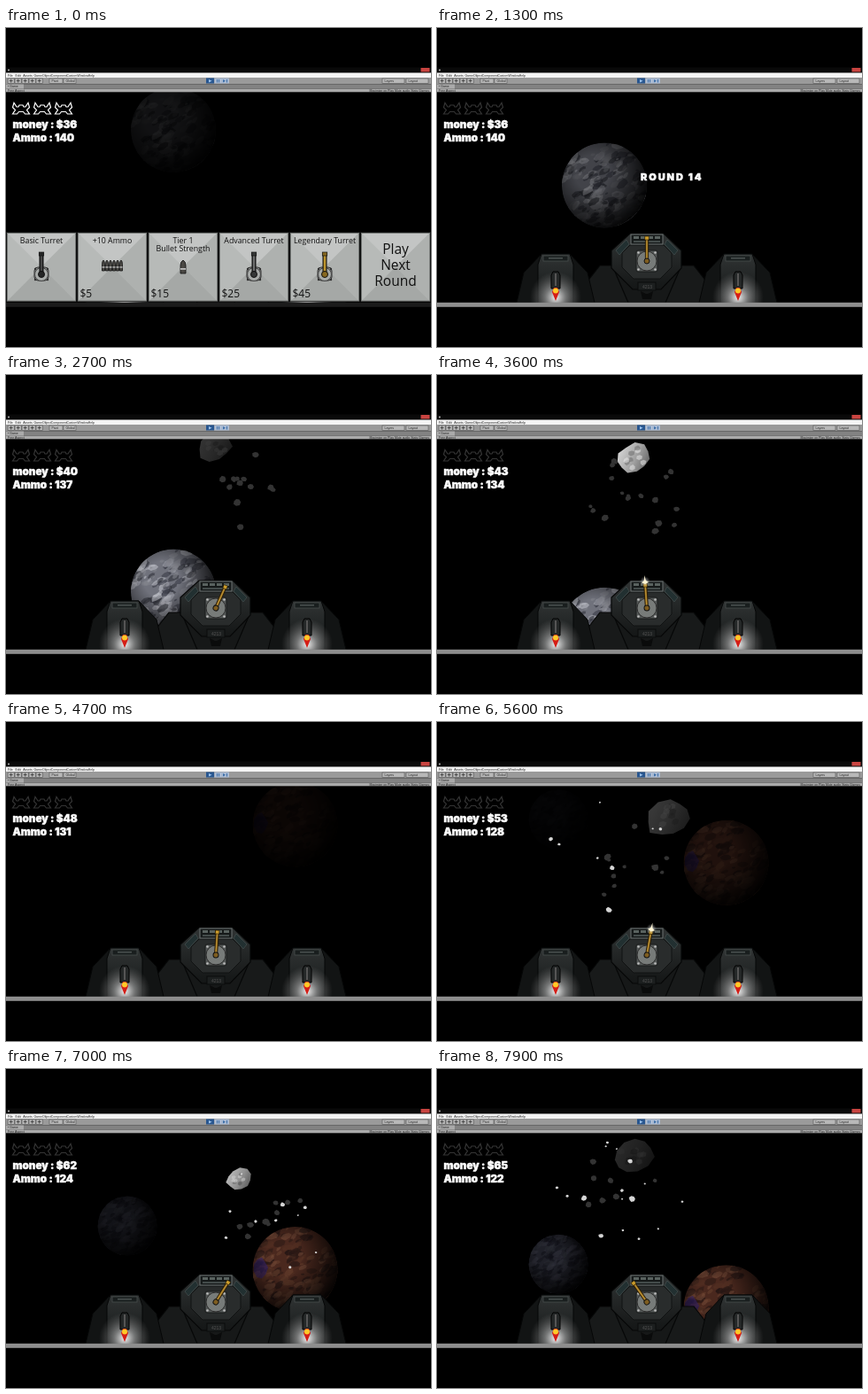
Animation of 480 by 360 pixels, one loop 8 s. Source, as an HTML page:

```html
<!DOCTYPE html>
<html lang="en">
<head>
<meta charset="utf-8">
<title>Asteroid defence</title>
<style>
html, body { margin: 0; width: 100%; height: 100%; overflow: hidden; background: #000; }
svg { display: block; width: 100vw; height: 100vh; }
.hud { font: 900 11.7px Inter, sans-serif; fill: #fff; stroke: #fff; stroke-width: .5; }
#round { font-size: 11px; letter-spacing: 1.9px; }
.card { font: 8.8px "Open Sans", sans-serif; fill: #111; }
.price { font: 12px "Open Sans", sans-serif; fill: #111; }
.play { font: 15.5px "Open Sans", sans-serif; fill: #111; }
.tiny { font: 3.5px "Liberation Sans", sans-serif; fill: #222; }
</style>
</head>
<body>
<svg viewBox="0 0 480 360">
  <defs>
    <radialGradient id="lamp">
      <stop offset="0" stop-color="#fff" stop-opacity=".95"/>
      <stop offset=".4" stop-color="#ccc" stop-opacity=".5"/>
      <stop offset="1" stop-color="#888" stop-opacity="0"/>
    </radialGradient>
    <radialGradient id="shade" cx=".36" cy=".36" r=".68">
      <stop offset=".3" stop-opacity="0"/>
      <stop offset="1" stop-opacity=".92"/>
    </radialGradient>
    <linearGradient id="hull" x2="0" y2="1">
      <stop offset="0" stop-color="#303434"/>
      <stop offset="1" stop-color="#141616"/>
    </linearGradient>
    <linearGradient id="stone" x2="1" y2="1">
      <stop offset="0" stop-color="#e0e0e0"/>
      <stop offset=".55" stop-color="#a0a0a0"/>
      <stop offset="1" stop-color="#555"/>
    </linearGradient>
    <clipPath id="view"><rect y="72" width="480" height="238"/></clipPath>
  </defs>
  <rect width="480" height="360"/>
  <g clip-path="url(#view)">
    <g id="planets"></g>
    <g id="rocks"></g>
    <g id="base"></g>
    <g id="barrel"></g>
  </g>
  <g id="lives" fill="none" stroke-width="1.2"></g>
  <text id="money" class="hud" x="7.5" y="112.5"></text>
  <text id="ammo" class="hud" x="7.5" y="127.5"></text>
  <text id="round" class="hud" x="230" y="172">ROUND 14</text>
  <g id="editor"></g>
  <rect id="status" y="309.8" width="480" height="5"/>
  <g id="shop"></g>
</svg>
<script>
const NS = 'http://www.w3.org/2000/svg';
const $ = id => document.getElementById(id);
const LOOP = 8000, STEP = 100;

function add(parent, tag, attrs = {}, text) {
  const node = document.createElementNS(NS, tag);
  for (const key in attrs) node.setAttribute(key, attrs[key]);
  if (text !== undefined) node.textContent = text;
  return parent.appendChild(node);
}
const rect = (p, x, y, width, height, fill, more) => add(p, 'rect', { x, y, width, height, fill, ...more });
const poly = (p, points, fill, more) => add(p, 'polygon', { points, fill, ...more });
const circle = (p, cx, cy, r, fill, more) => add(p, 'circle', { cx, cy, r, fill, ...more });
const label = (p, x, y, text, cls, more) => add(p, 'text', { x, y, class: cls, ...more }, text);
const show = (node, on) => node.setAttribute('display', on ? 'inline' : 'none');
const move = (node, x, y, turn = 0) => node.setAttribute('transform', `translate(${x} ${y}) rotate(${turn})`);
const clamp = v => Math.max(0, Math.min(1, v));

const random = seed => () => (seed = (seed * 16807) % 2147483647) / 2147483647;

function blob(rnd, rx, ry, count) {
  return Array.from({ length: count }, (_, i) => {
    const a = i / count * Math.PI * 2, k = .8 + rnd() * .3;
    return (Math.cos(a) * rx * k).toFixed(1) + ',' + (Math.sin(a) * ry * k).toFixed(1);
  }).join(' ');
}

// Linear interpolation over [time, value] pairs
function track(keys, t) {
  const next = keys.findIndex(([time]) => t <= time);
  if (next === 0) return keys[0][1];
  if (next < 0) return keys[keys.length - 1][1];
  const [[a, from], [b, to]] = [keys[next - 1], keys[next]];
  return from + (to - from) * (t - a) / (b - a);
}

// A planet sinks at a steady rate and brightens on the way down
const SINK = 48;
function makePlanet(id, x, y0, r, ground, patches) {
  const rnd = random(r * 31 + x), node = add($('planets'), 'g');
  const clip = add(add(node, 'clipPath', { id }), 'circle', { r });
  const disc = add(node, 'g', { 'clip-path': `url(#${id})` });
  circle(disc, 0, 0, r, ground);
  for (let i = 0; i < 190; i++) {
    const a = rnd() * 6.28, d = Math.sqrt(rnd()) * r, s = 1 + rnd() * r * .07;
    const patch = poly(disc, blob(rnd, s * 2, s, 7), patches[i % patches.length], { opacity: .55 });
    move(patch, Math.cos(a) * d, Math.sin(a) * d, -60 + rnd() * 60);
  }
  if (id === 'red') move(poly(disc, blob(rnd, 8, 12, 9), '#2a1f78', { opacity: .5 }), -39, -2);
  circle(disc, 0, 0, r + 1, 'url(#shade)');
  return { x, y0, node };
}
const planets = [
  makePlanet('grey', 189, 115, 48, '#70727c', ['#a9abb4', '#363843', '#85878f', '#292a32', '#c4c5cc']),
  makePlanet('red', 326.5, -110, 48, '#4a281e', ['#68402f', '#2b1814', '#553023', '#201313', '#754c3a']),
  makePlanet('dusk', 137, -159, 33.5, '#202129', ['#30313b', '#15151c', '#292a32', '#101016'])
];

// Each wave: an asteroid at x, y at a given time, with debris flying out of a point beside it
const waves = [
  { at: 2.7, x: 237, y: 80, size: 19, glow: .25, side: 25, dim: 13, lit: 0 },
  { at: 3.6, x: 222, y: 94, size: 19, glow: 1, side: 3, dim: 17, lit: 0 },
  { at: 5.6, x: 262, y: 108, size: 24, glow: .28, side: -65, dim: 11, lit: 8 },
  { at: 7.0, x: 263, y: 125, size: 14, glow: .9, side: 25, dim: 9, lit: 10 },
  { at: 7.9, x: 222, y: 98, size: 22, glow: .2, side: -15, dim: 7, lit: 16 }
];
const rnd = random(73);
for (const wave of waves) {
  wave.node = add($('rocks'), 'g');
  const body = wave.body = add(wave.node, 'g', { opacity: wave.glow });
  poly(body, blob(rnd, wave.size * 1.08, wave.size * .86, 11), 'url(#stone)');
  for (let i = 0; i < 9; i++) {
    const spot = poly(body, blob(rnd, wave.size * .2, wave.size * .16, 6), i % 2 ? '#666' : '#eee', { opacity: .5 });
    move(spot, (rnd() - .5) * wave.size, (rnd() - .5) * wave.size);
  }
  wave.bits = Array.from({ length: wave.dim + wave.lit }, (_, i) => {
    const lit = i >= wave.dim, a = rnd() * 6.28, d = rnd() * (lit ? 85 : 65);
    const r = lit ? 1 + rnd() * rnd() * 3 : 2 + rnd() * 2;
    const node = poly(wave.node, blob(rnd, r * 1.1, r, 7), lit ? '#d5d5d5' : '#333');
    return { dx: Math.cos(a) * d, dy: Math.sin(a) * d * .75, node };
  });
}

function renderWave(wave, t) {
  const dt = t - wave.at;
  show(wave.node, dt > -.75 && dt < .6);
  move(wave.body, wave.x, wave.y + 36 * dt, -25 + dt * 25);
  for (const { dx, dy, node } of wave.bits) {
    const spread = 1 + dt * .4;
    move(node, wave.x + wave.side + dx * spread, wave.y + 45 + dy * spread + 14 * dt, dt * 50);
  }
}

function sideTurret(x) {
  const g = add($('base'), 'g', { transform: `translate(${x} 0)` });
  const edge = { stroke: '#050606', 'stroke-width': 1 };
  poly(g, '-16,255 16,255 36,276 44,310 -44,310 -36,276', '#121414', edge);
  poly(g, '-16,255 16,255 20,267 20,310 -20,310 -20,267', 'url(#hull)', edge);
  rect(g, -14, 257, 28, 6, '#191e1e', { stroke: '#484e4d', 'stroke-width': .8 });
  rect(g, -8, 259, 16, 1.5, '#4b5251');
  circle(g, 0, 304, 29, 'url(#lamp)');
  poly(g, '-3,275 3,275 5,279 5,294 -5,294 -5,279', '#252828', { stroke: '#000' });
  rect(g, -1, 277, 2, 14, '#555');
  poly(g, '-2,293 2,293 4,298 0,308 -4,298', '#d51d16');
  circle(g, 0, 296.5, 3, '#ffc928');
}

function buildBase() {
  const g = $('base'), edge = { stroke: '#060707', 'stroke-width': 1.2 };
  poly(g, '198,268 175,310 300,310 276,268', '#161818', edge);
  for (const side of [-1, 1]) {
    const wing = add(g, 'g', { transform: `translate(237 0) scale(${side} 1)` });
    poly(wing, '39,268 53,268 86,310 21,310', '#181a1a', edge);
  }
  [134, 340].forEach(sideTurret);
  poly(g, '218,232 256,232 276,251 276,271 253,295 221,295 197,271 197,251', 'url(#hull)', edge);
  poly(g, '218,245 256,245 265,254 265,270 252,283 222,283 209,270 209,254', '#292c2c', { stroke: '#101212' });
  for (const side of [-1, 1]) {
    const glass = add(g, 'g', { transform: `translate(237 0) scale(${side} 1)` });
    poly(glass, '35,251 23,239 20,244 31,256', '#223031', { stroke: '#465050', 'stroke-width': .7 });
  }
  rect(g, 219, 233, 36, 11, '#161a1a', { stroke: '#6c7372' });
  for (let x = 222; x < 252; x += 8) rect(g, x, 235, 6, 3, '#59625f');
  rect(g, 222, 240, 30, 2, '#434b4a');
  rect(g, 225, 251, 24, 24, '#555958', { rx: 2, stroke: '#181a1a' });
  circle(g, 237, 263, 11, '#777b79', { stroke: '#2b2b2b' });
  for (const x of [227.5, 246.5]) for (const y of [253.5, 272.5]) circle(g, x, y, 1.3, '#bbb');
  rect(g, 227, 287, 20, 9, '#1c1f1f', { stroke: '#0b0c0c' });
  label(g, 232, 294, '4213', 'tiny', { style: 'font-size:5px;fill:#555' });
  poly(g, '230,297 236,300 238,300 244,297 242,306 232,306', '#0a0b0b');

  const b = $('barrel');
  poly(b, '-1.6,0 -1.6,-27 1.6,-27 1.6,0', '#85601a', { stroke: '#211706', 'stroke-width': .8 });
  rect(b, -.6, -25, 1.2, 23, '#bd9336');
  rect(b, -2.2, -28, 4.4, 4, '#cc9d2c', { stroke: '#221804', 'stroke-width': .6 });
  circle(b, 0, 0, 3, '#7e5d20', { stroke: '#111' });
  const flash = add(b, 'g', { id: 'flash' });
  circle(flash, 0, -30, 6, 'url(#lamp)');
  poly(flash, '-4,-29 -1,-31 0,-37 1,-31 4,-29 0,-27', '#fff6d5');
}

function turretIcon(g, body, glow) {
  rect(g, 31, 270, 16, 15, '#8b8e8d', { rx: 4, stroke: '#333' });
  circle(g, 39, 278, 7.5, '#a7aaa8', { stroke: '#444' });
  for (const x of [32, 46]) for (const y of [272, 284]) circle(g, x, y, 1.2, '#333');
  rect(g, 37, 254, 4, 23, body, { stroke: '#111' });
  rect(g, 38.3, 256, 1.4, 18, glow);
  rect(g, 36.3, 253, 5.4, 4, body, { stroke: '#111', 'stroke-width': .7 });
  circle(g, 39, 278, 3.5, body, { stroke: '#111' });
}

function bulletIcon(g, x, w, h) {
  const d = `M${x - w / 2} ${262 + h}v${-h * .6}q0 ${-h * .3} ${w / 2} ${-h * .4}q${w / 2} ${h * .1} ${w / 2} ${h * .4}v${h * .6}z`;
  add(g, 'path', { d, fill: '#4a4844', stroke: '#111', 'stroke-width': .8 });
  rect(g, x - w / 2, 262 + h * .6, w, h * .12, '#bbb');
}

const goods = [
  { lines: ['Basic Turret'], icon: g => turretIcon(g, '#252626', '#555') },
  { lines: ['+10 Ammo'], price: '$5', icon: g => { for (let x = 29; x < 50; x += 4) bulletIcon(g, x, 3, 12); } },
  { lines: ['Tier 1', 'Bullet Strength'], price: '$15', icon: g => bulletIcon(g, 39, 6, 15) },
  { lines: ['Advanced Turret'], price: '$25', icon: g => turretIcon(g, '#353737', '#888') },
  { lines: ['Legendary Turret'], price: '$45', icon: g => turretIcon(g, '#876820', '#d6aa35') },
  { lines: ['Play', 'Next', 'Round'], big: true }
];

function buildShop() {
  rect($('shop'), 0, 230, 480, 79, '#121313');
  goods.forEach(({ lines, price, icon, big }, i) => {
    const card = add($('shop'), 'g', { transform: `translate(${i * 80 + 1} 0)` });
    const face = add(card, 'g', { transform: 'translate(.5 231.5)' });
    rect(face, 0, 0, 77, 76.5, '#b7bab8');
    poly(face, '0,0 77,0 38.5,38', '#c3c5c4');
    poly(face, '0,76.5 77,76.5 38.5,38', '#a5a8a6');
    poly(face, '77,0 77,76.5 38.5,38', '#aeb1af');
    rect(face, 0, 0, 77, 76.5, 'none', { stroke: '#747775' });
    lines.forEach((line, n) => label(card, 39, big ? 255 + n * 18 : 242.5 + n * 9, line,
      big ? 'play' : 'card', { 'text-anchor': 'middle' }));
    if (price) label(card, 2.5, 303.5, price, 'price');
    if (icon) icon(card);
  });
}

function button(g, x, width, text = '') {
  rect(g, x, 57, width, 5.3, '#b8b8b8', { stroke: '#555', 'stroke-width': .6 });
  label(g, x + 2.5, 61, text, 'tiny');
}

function buildEditor() {
  const g = $('editor');
  rect(g, 0, 44.5, 480, 6, '#090909');
  circle(g, 3, 47.5, 1, '#bbb');
  rect(g, 468.5, 45, 10, 4.5, '#c94440');
  rect(g, 0, 50.5, 480, 5.5, '#f4f4f4');
  let x = 2;
  for (const item of ['File', 'Edit', 'Assets', 'GameObject', 'Component', 'Custom', 'Window', 'Help']) {
    label(g, x, 54.5, item, 'tiny');
    x += item.length * 1.8 + 1.4;
  }
  rect(g, 0, 56, 480, 7.5, '#9a9a9a');
  for (let i = 0; i < 5; i++) {
    button(g, 2 + i * 8, 7.5);
    add(g, 'path', { d: `M${3.7 + i * 8} 59.6h4m-2-2v4`, stroke: '#333', 'stroke-width': .8 });
  }
  button(g, 49, 15, 'Pivot');
  button(g, 65, 14, 'Global');
  button(g, 425, 25, 'Layers');
  button(g, 452, 25, 'Layout');
  rect(g, 226, 56.5, 9, 6, '#28568f');
  rect(g, 235.5, 56.5, 16.5, 6, '#a9bad2');
  poly(g, '229,58 229,61.5 232.5,59.7', '#9cc4ee');
  poly(g, '245,58 245,61.5 248,59.7', '#3d6fa8');
  for (const bar of [238, 240, 249]) rect(g, bar, 58, 1, 3.5, '#3d6fa8');
  rect(g, 0, 63.5, 480, 5, '#828282');
  rect(g, 0, 63.5, 20, 5, '#aaa');
  label(g, 2, 67.2, '• Game', 'tiny');
  rect(g, 0, 68.5, 480, 3.8, '#aaa');
  label(g, 2, 71.5, 'Free Aspect', 'tiny');
  label(g, 478, 71.5, 'Maximize on Play  Mute audio  Stats  Gizmos', 'tiny', { 'text-anchor': 'end' });
}

function buildLives() {
  for (let x = 7; x < 70; x += 24)
    add($('lives'), 'path', { d: `M${x + 2} 84.5l-1.5 5 3 3-3 4.5h5l2-2.5h5l2 2.5h5l-3-4.5 3-3-1.5-5-3 4.5h-2l-1-2h-4l-1 2h-2z` });
}

const firstShot = 1.59, shotGap = 1 / 3;
const moneyKeys = [[1.8, 36], [2.7, 40], [3.6, 43], [5.6, 53], [7, 62], [7.9, 65]];
const aimKeys = [[1.6, 0], [2.7, 24], [3.6, -4], [5.6, 10], [7, 32], [7.9, -35]];

function render(t) {
  const shopping = t < .5;
  for (const { x, y0, node } of planets) {
    const y = y0 + SINK * t;
    move(node, x, y);
    node.setAttribute('opacity', clamp((y - 72) / 150) ** 1.5);
  }
  for (const wave of waves) renderWave(wave, t);
  move($('barrel'), 237, 263, track(aimKeys, t));

  const shots = Math.max(0, (t - firstShot) / shotGap);
  show($('flash'), shots >= 1 && shots % 1 < .2);
  $('ammo').textContent = 'Ammo : ' + (140 - Math.floor(shots));
  $('money').textContent = 'money : $' + Math.floor(track(moneyKeys, t) + 1e-6);
  $('lives').setAttribute('stroke', shopping ? '#fff' : '#343434');
  $('status').setAttribute('fill', shopping ? '#1b1b1b' : '#8e8e8e');
  show($('shop'), shopping);
  show($('round'), !shopping && t < 1.9);
}

buildBase();
buildShop();
buildEditor();
buildLives();

const start = performance.now();
function frame() {
  const ms = (performance.now() - start) % LOOP;
  render(Math.floor(ms / STEP) * STEP / 1000);
  requestAnimationFrame(frame);
}
frame();
</script>
</body>
</html>
```
